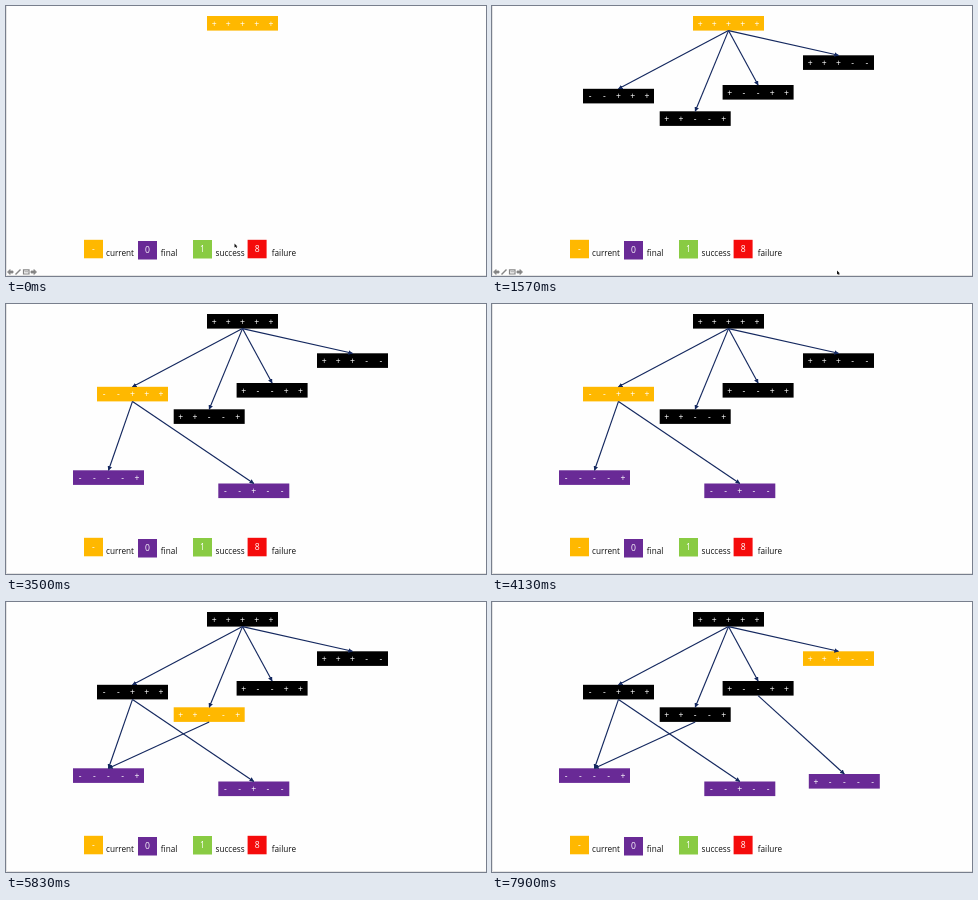
Write an HTML page that moves like this. It is 480x270 px and loops after 8000 ms.

```html
<!DOCTYPE html>
<html lang="en">
<head>
<meta charset="utf-8">
<title>Flip game search tree</title>
<style>
  html, body { margin: 0; width: 100%; height: 100%; overflow: hidden; background: #fefefe; }
  svg { display: block; width: 480px; height: 270px; font-family: "Open Sans", "Noto Sans", sans-serif; }
  .cell { fill: #fff; font-size: 8.6px; text-anchor: middle; }
  .label { fill: #111; font-size: 8.2px; }
  .edge { stroke: #14285f; stroke-width: 1.15; }
</style>
</head>
<body>
<svg viewBox="0 0 480 270">
  <defs>
    <marker id="head" viewBox="0 0 5 5" refX="4.5" refY="2.5" markerWidth="4.6" markerHeight="4.6"
            markerUnits="userSpaceOnUse" orient="auto">
      <path d="M0 0L5 2.5L0 5z" fill="#14285f"/>
    </marker>
  </defs>
  <path d="M.5 0V269.5H480" fill="none" stroke="#e4e4e4"/>
  <g id="tree"></g>
  <g id="legend"></g>
  <g id="toolbar" fill="#858585" stroke="#858585" stroke-width=".8">
    <path d="M1.5 266L4 263.5V265H7V267H4V268.5z"/>
    <path d="M9.5 268.5L14.5 263.5" stroke-width="1.4"/>
    <path d="M17.5 263.8H23V268H17.5z" fill="#fff" stroke-width="1.2"/>
    <path d="M18.5 265.8H22"/>
    <path d="M30.5 266L28 263.5V265H25V267H28V268.5z"/>
  </g>
  <path id="cursor" d="M0 0V4L1 3.2L1.8 4.6L2.5 4.2L1.8 2.9H3z" fill="#111"/>
</svg>
<script>
const LOOP = 8000;
const COLORS = { current: '#ffb800', final: '#692a96', plain: '#000', success: '#89cb43', failure: '#f50b0b' };
const NODE = { w: 71, h: 14.6 };

// Each node is highlighted from `on` to `off`.
const nodes = {
  root:   { x: 201,   y: 10,    text: '+++++', show: 0,    on: 0,    off: 1630 },
  left:   { x: 91,    y: 82.8,  text: '--+++', show: 600,  on: 1630, off: 4300 },
  low:    { x: 167.7, y: 105.3, text: '++--+', show: 600,  on: 4300, off: 6300 },
  middle: { x: 230.6, y: 79,    text: '+--++', show: 600,  on: 6300, off: 7650 },
  right:  { x: 311,   y: 49.3,  text: '+++--', show: 600,  on: 7650, off: LOOP },
  endA:   { x: 67,    y: 166.3, text: '----+', show: 2150, final: true },
  endB:   { x: 212.3, y: 179.5, text: '--+--', show: 2150, final: true },
  endC:   { x: 316.8, y: 172,   text: '+----', show: 7100, final: true }
};
const edges = [
  ['root', 'left', 600], ['root', 'low', 600], ['root', 'middle', 600], ['root', 'right', 600],
  ['left', 'endA', 2150], ['left', 'endB', 2150], ['low', 'endA', 4800], ['middle', 'endC', 7100]
];
const legend = [
  [78, 233.8, '-', 'current', 100], [132, 235, '0', 'final', 154.8],
  [187, 234, '1', 'success', 209.5], [241.6, 233.8, '8', 'failure', 265.8]
];

const byId = id => document.getElementById(id);
const tree = byId('tree');

function add(parent, tag, attrs, text) {
  const el = document.createElementNS('http://www.w3.org/2000/svg', tag);
  for (const key in attrs) el.setAttribute(key, attrs[key]);
  if (text) el.textContent = text;
  return parent.appendChild(el);
}

for (const node of Object.values(nodes)) {
  node.el = add(tree, 'g', { transform: `translate(${node.x} ${node.y})` });
  node.box = add(node.el, 'rect', { width: NODE.w, height: NODE.h });
  [...node.text].forEach((sign, i) =>
    add(node.el, 'text', { class: 'cell', x: 7.1 + i * 14.2, y: 10.5 }, sign));
}

const arrows = edges.map(([from, to, show]) => ({
  show,
  el: add(tree, 'line', {
    class: 'edge', 'marker-end': 'url(#head)',
    x1: nodes[from].x + NODE.w / 2, y1: nodes[from].y + NODE.h,
    x2: nodes[to].x + NODE.w / 2, y2: nodes[to].y
  })
}));

for (const [x, y, sign, name, labelX] of legend) {
  add(byId('legend'), 'rect', { x, y, width: 19, height: 18.5, fill: COLORS[name] });
  add(byId('legend'), 'text', { class: 'cell', x: x + 9.5, y: y + 12.4 }, sign);
  add(byId('legend'), 'text', { class: 'label', x: labelX, y: 249.6 }, name);
}

const setVisible = (el, on) => el.setAttribute('visibility', on ? 'visible' : 'hidden');

function render(time) {
  for (const node of Object.values(nodes)) {
    const active = time >= node.on && time < node.off;
    setVisible(node.el, time >= node.show);
    node.box.setAttribute('fill', COLORS[node.final ? 'final' : active ? 'current' : 'plain']);
  }
  for (const arrow of arrows) setVisible(arrow.el, time >= arrow.show);

  const p = Math.min(1, Math.max(0, (time - 70) / 400));
  const ease = p * p * (3 - 2 * p);
  byId('cursor').setAttribute('transform', `translate(${228.5 + 116.5 * ease} ${237.5 + 27 * ease})`);
  setVisible(byId('cursor'), time < 3100);
  setVisible(byId('toolbar'), time < 3100);
}

function tick() {
  render(performance.now() % LOOP);
  requestAnimationFrame(tick);
}
tick();
</script>
</body>
</html>
```
